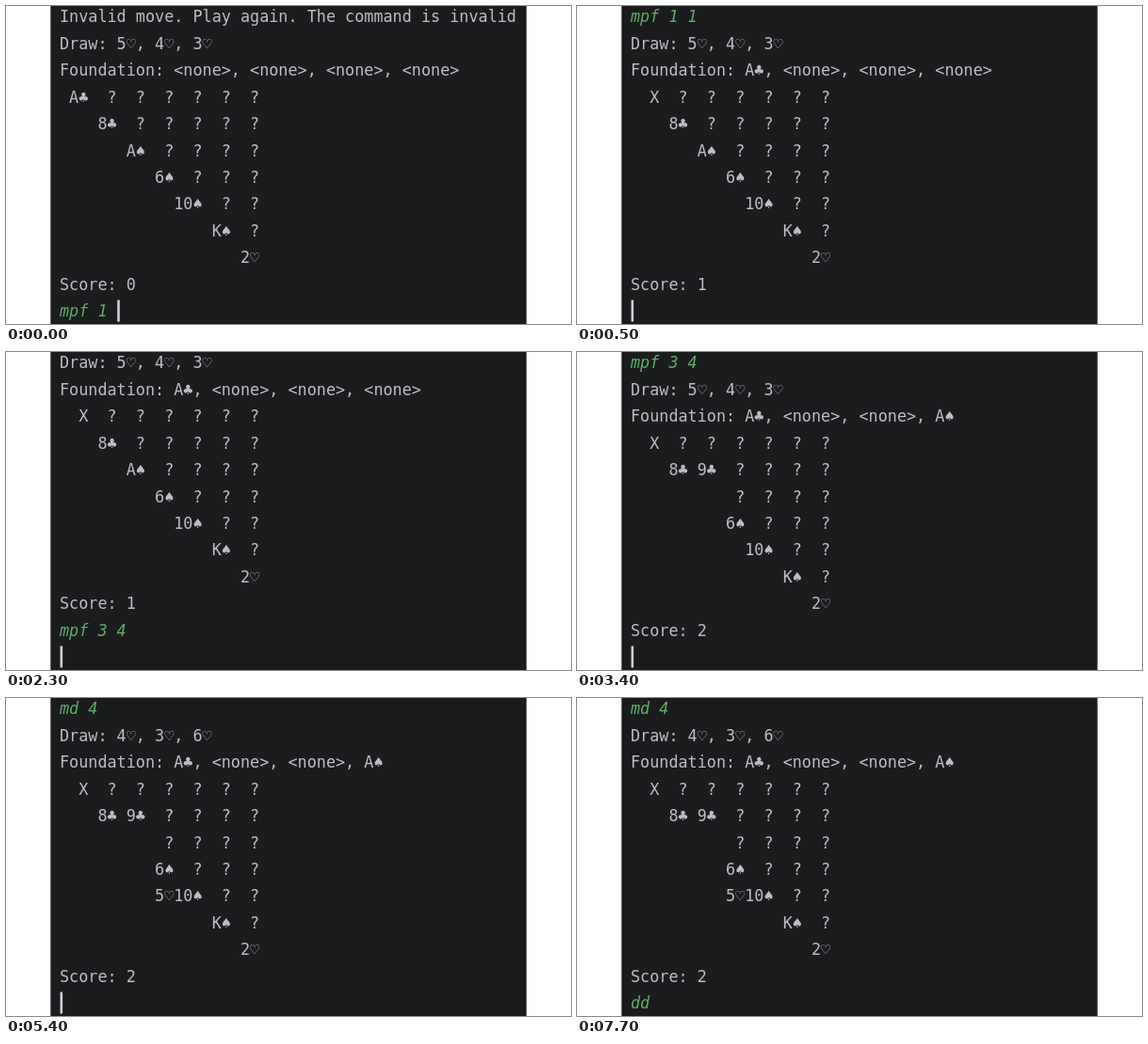
These frames come from a looping animation (600 by 338 pixels, 8000 ms). An HTML page:

```html
<!DOCTYPE html>
<html lang="en">
<head>
<meta charset="utf-8">
<title>Terminal solitaire</title>
<style>
  html, body { margin: 0; width: 100%; height: 100%; overflow: hidden; background: #fff; }
  svg { display: block; }
  text { font: 16.8px "DejaVu Sans Mono", monospace; white-space: pre; fill: #bcbec4; }
  .typed { font-style: italic; fill: #5fad65; }
</style>
</head>
<body>
<svg width="600" height="338" viewBox="0 0 600 338">
  <rect x="47.3" width="505.4" height="338" fill="#1b1c1e"/>
  <g id="screen"></g>
  <rect id="cursor" y="312.5" width="2.6" height="23" fill="#ced0d6"/>
</svg>
<script>
const LOOP = 8000, ROWS = 12, LEFT = 57, ADVANCE = 10.114, BASELINE = 17.2, LINE = 28.47;
const NONE = '<none>';

// Every tableau row is right-aligned: its face-up cards, then the hidden ones.
const board = (draw, foundation, fronts, hidden, score) => [
  'Draw: ' + draw.join(', '),
  'Foundation: ' + foundation.join(', '),
  ...fronts.map((cards, i) => (cards + '  ?'.repeat(hidden[i])).padStart(21)),
  'Score: ' + score,
];

const firstDraw = ['5♡', '4♡', '3♡'];
const dealt = [6, 5, 4, 3, 2, 1, 0], moved = [6, 4, 4, 3, 2, 1, 0];
const boards = [
  board(firstDraw, [NONE, NONE, NONE, NONE],
    ['A♣', '8♣', 'A♠', '6♠', '10♠', 'K♠', '2♡'], dealt, 0),
  board(firstDraw, ['A♣', NONE, NONE, NONE],
    ['X', '8♣', 'A♠', '6♠', '10♠', 'K♠', '2♡'], dealt, 1),
  board(firstDraw, ['A♣', NONE, NONE, 'A♠'],
    ['X', '8♣ 9♣', '', '6♠', '10♠', 'K♠', '2♡'], moved, 2),
  board(['4♡', '3♡', '6♡'], ['A♣', NONE, NONE, 'A♠'],
    ['X', '8♣ 9♣', '', '6♠', '5♡10♠', 'K♠', '2♡'], moved, 2),
];

// Key times per command; the reply follows after the enter time.
const commands = [
  { text: 'mpf 1 1', keys: [0, 0, 0, 0, 0, 0, 100], enter: 200, reply: 400 },
  { text: 'mpf 3 4', keys: [900, 1100, 1300, 1500, 1900, 2000, 2100], enter: 2200, reply: 2400 },
  { text: 'md 4', keys: [3500, 3700, 3800, 3900], enter: 4200, reply: 4400 },
  { text: 'dd', keys: [7000, 7200], enter: Infinity },
];
const cursorOff = [[3000, 3400], [5000, 5400], [5700, 6000], [6400, 6700], [7600, LOOP]];

const plain = text => ({ text, typed: false });

function transcript(t) {
  const lines = ['Invalid move. Play again. The command is invalid', ...boards[0]].map(plain);
  for (const [i, { text, keys, enter, reply }] of commands.entries()) {
    lines.push({ text: text.slice(0, keys.filter(k => k <= t).length), typed: true });
    if (t < enter) break;
    if (t < reply) { lines.push(plain('')); break; }
    lines.push(...boards[i + 1].map(plain));
  }
  return lines.slice(-ROWS);
}

const screen = document.getElementById('screen');
const cursor = document.getElementById('cursor');
const rows = Array.from({ length: ROWS }, (_, i) => {
  const row = document.createElementNS('http://www.w3.org/2000/svg', 'text');
  row.setAttribute('x', LEFT);
  row.setAttribute('y', BASELINE + i * LINE);
  return screen.appendChild(row);
});

function render(now) {
  const t = now % LOOP, lines = transcript(t);
  rows.forEach((row, i) => {
    const { text, typed } = lines[i];
    if (row.textContent !== text) row.textContent = text;
    row.setAttribute('class', typed ? 'typed' : '');
  });
  cursor.setAttribute('x', LEFT + 0.5 + lines[ROWS - 1].text.length * ADVANCE);
  const hidden = cursorOff.some(([from, to]) => t >= from && t < to);
  cursor.setAttribute('visibility', hidden ? 'hidden' : 'visible');
  requestAnimationFrame(render);
}
render(performance.now());
</script>
</body>
</html>
```
